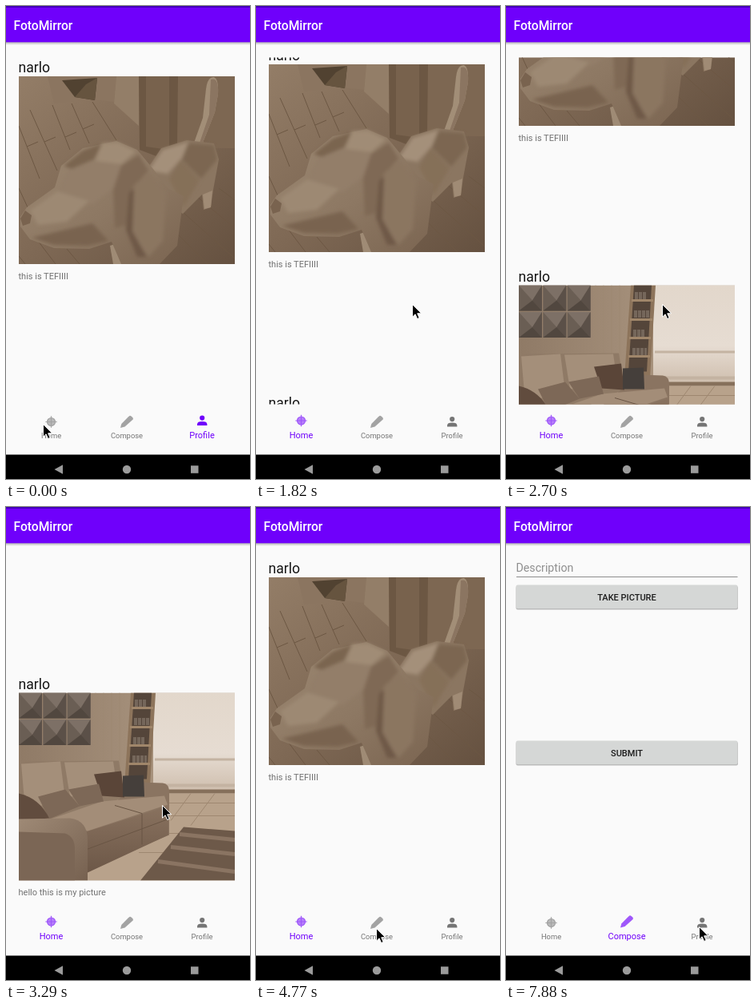
An HTML page that plays this animation: 305x592 px, repeating every 8000 ms.

```html
<!DOCTYPE html>
<html lang="en">
<head>
<meta charset="utf-8">
<title>Photo feed</title>
<style>
  html, body { margin: 0; width: 100%; height: 100%; overflow: hidden; background: #fafafa; }
  svg { display: block; width: 100%; height: 100%; }
  text { font-family: Roboto, sans-serif; }
  .bar { font-size: 15.6px; font-weight: 500; fill: #fff; }
  .user { font-size: 17.6px; fill: #151515; }
  .note { font-size: 11px; fill: #727272; }
  .hint { font-size: 14.2px; fill: #8f8f8f; }
  .button { font-size: 11px; font-weight: 500; fill: #1c1c1c; text-anchor: middle; }
  .tab { color: #757575; }
  .tab text { font-size: 9.4px; text-anchor: middle; fill: currentColor; }
  .tab .icon { fill: currentColor; stroke: none; }
  .tab .pale { opacity: .65; }
  .tab.on { color: #6f00fb; }
  .tab.on text { font-size: 11px; }
  .tab.on .icon { transform: translateY(-1.5px); }
</style>
</head>
<body>
<svg viewBox="0 0 305 592" preserveAspectRatio="none">
  <defs>
    <clipPath id="feedArea"><rect x="0" y="64.5" width="305" height="434"/></clipPath>
    <clipPath id="photoArea"><rect width="270" height="235"/></clipPath>
    <filter id="soft"><feGaussianBlur stdDeviation="2.2"/></filter>
    <linearGradient id="shade" x2="0" y2="1">
      <stop stop-color="#000" stop-opacity=".3"/><stop offset="1" stop-color="#000" stop-opacity="0"/>
    </linearGradient>
    <linearGradient id="floor" x2="1" y2="1">
      <stop stop-color="#937d67"/><stop offset=".5" stop-color="#7f6955"/><stop offset="1" stop-color="#655140"/>
    </linearGradient>
    <linearGradient id="fur" x2="1" y2="1">
      <stop stop-color="#9c8872"/><stop offset=".55" stop-color="#8d7863"/><stop offset="1" stop-color="#7b6551"/>
    </linearGradient>
    <linearGradient id="wall" x2="1" y2="0">
      <stop stop-color="#8f7a66"/><stop offset="1" stop-color="#b5a08a"/>
    </linearGradient>
    <linearGradient id="window" x2="0" y2="1">
      <stop stop-color="#e2d7cb"/><stop offset=".6" stop-color="#e6dcd2"/><stop offset="1" stop-color="#cdbcab"/>
    </linearGradient>
    <linearGradient id="front" x2="0" y2="1">
      <stop stop-color="#89725f"/><stop offset="1" stop-color="#6c5747"/>
    </linearGradient>
    <linearGradient id="arm" x2="1" y2="1">
      <stop stop-color="#9f8a76"/><stop offset="1" stop-color="#766150"/>
    </linearGradient>
    <g id="pyramid">
      <path fill="#6a5e54" d="M0 0H29V32H0Z"/>
      <path fill="#7d7066" d="M0 0H29L17 19Z"/>
      <path fill="#5b5048" d="M29 0V32L17 19Z"/>
      <path fill="#51473f" d="M0 32H29L17 19Z"/>
    </g>
  </defs>

  <rect width="305" height="592" fill="#fafafa"/>

  <g id="feed" clip-path="url(#feedArea)">
    <g id="posts">
      <g>
        <text class="user" x="15.5" y="83">narlo</text>
        <g transform="translate(16 88)" clip-path="url(#photoArea)">
          <rect width="270" height="235" fill="url(#floor)"/>
          <path fill="#8b7560" d="M36 0H122L119 32 94 29 44 34Z"/>
          <path fill="#514231" d="M54 5 98 2 95 30 70 26Z"/>
          <path fill="#66543f" d="M70 26 84 10 98 2 95 30Z"/>
          <path fill="#937e68" d="M122 0H150V62L119 34Z"/>
          <path fill="#6c5743" d="M150 0H200L198 110 151 92Z"/>
          <path fill="#78624d" d="M159 0H188V92L159 88Z"/>
          <path fill="#7d6752" d="M199 0H270V90H198Z"/>
          <path fill="none" stroke="#6c5743" stroke-width="1" d="M0 62 26 128M14 42 48 118M42 36 64 92M66 34 88 84M92 32 122 80M0 140 12 166M10 88 24 82M32 82 46 76M58 76 72 70M80 66 94 60M0 225 8 235M24 206 46 235M60 216 76 235M205 170 270 228M222 150 270 190M196 195 236 235M250 140 270 155"/>
          <path fill="#a28e77" d="M218 86 230 52 234 16Q236 0 244 1Q250 3 249 22L245 45 228 88Z"/>
          <path fill="#8b7561" d="M240 4Q250 0 249 22L245 45 228 88 225 86 238 48Z"/>
          <path fill="#8b7661" d="M158 120 178 90 210 80 244 84 250 104 243 142 240 164 231 167 229 148 205 172 186 160Z"/>
          <g filter="url(#soft)">
            <path fill="#a4907a" d="M162 118 180 92 212 82 204 102 186 122Z"/>
            <path fill="#7c6651" d="M212 84 244 86 248 104 228 128 204 104Z"/>
            <path fill="#857059" d="M202 104 226 130 206 164 188 128Z"/>
          </g>
          <path fill="#a08b75" d="M230 148 242 143 240 164 232 166Z"/>
          <path fill="#9f8b75" d="M114 212 126 208 130 235H118Z"/>
          <path fill="url(#fur)" d="M2 176 10 164 45 139 53 112 80 90 122 81 148 92 168 116 186 140 206 150 198 212 176 235H128L116 207 88 216 44 215 14 204 2 188Z"/>
          <g filter="url(#soft)">
            <path fill="#7a6550" d="M56 112 80 93 104 84 94 104 66 116Z"/>
            <path fill="#a08c76" d="M104 84 124 83 146 94 128 110 96 106Z"/>
            <path fill="#937e69" d="M60 118 96 106 128 110 118 140 92 160 50 146Z"/>
            <path fill="#9d8973" d="M14 168 48 144 88 156 60 182 24 186Z"/>
            <path fill="#7f6954" d="M128 112 150 98 162 118 142 140 134 186 120 190 118 142Z"/>
            <path fill="#8b7661" d="M144 136 164 120 184 146 180 206 162 226 140 196Z"/>
            <path fill="#6e5946" d="M138 146 144 140 142 194 160 226 148 226 134 192Z"/>
            <path fill="#79644f" d="M16 202 50 194 92 184 112 206 86 212 44 211Z"/>
          </g>
          <path fill="#79634f" d="M2 178 8 168 16 174 14 184 5 187Z"/>
        </g>
        <text class="note" x="15.5" y="341.5">this is TEFIIII</text>
      </g>
      <g transform="translate(0 434.5)">
        <text class="user" x="15.5" y="83">narlo</text>
        <g transform="translate(16 88)" clip-path="url(#photoArea)">
          <rect width="270" height="235" fill="url(#wall)"/>
          <path stroke="#9d8872" d="M96 0V95M106 0V95M116 0V95M126 0V95"/>
          <g id="panels"></g>
          <rect x="168" width="102" height="126" fill="url(#window)"/>
          <path fill="#c4b3a2" d="M170 82H270V85H170ZM172 114H270V118H172Z"/>
          <path fill="#86705b" d="M186 121H270V126H186Z"/>
          <path fill="#8d745b" d="M140 0H171L164 116H132Z"/>
          <path fill="#54453a" d="M144 0H166L160 108H137Z"/>
          <path stroke="#a0866a" stroke-width="3" d="M141 19H168M139 43H167M138 66H165M137 89H164"/>
          <path stroke="#75675b" stroke-width="9" stroke-dasharray="4 1" d="M145 13H160M144 36H163M143 60H157M142 83H160"/>
          <path fill="#b8a28b" d="M160 126H270V235H40Z"/>
          <path stroke="#9e8770" d="M186 138H270M190 154H270M172 176H260M215 126 190 160M245 126 215 166M150 200H190"/>
          <path fill="#6d5949" d="M206 168 270 173V235H152Z"/>
          <path stroke="#8a7462" stroke-width="5" d="M201 177 270 184M190 193 270 202M174 211 270 224"/>
          <path fill="#8f7a66" d="M0 90 8 86 125 85 132 130 84 152 0 162Z"/>
          <path fill="#a48f7a" d="M3 89 52 86 58 134 8 146ZM57 87 118 86 124 126 64 130Z"/>
          <path fill="#8a7461" d="M150 112 180 113Q188 114 188 124V178L84 222V168Z"/>
          <path fill="#a38d78" d="M40 158 104 136 182 129 186 140 86 173Z"/>
          <path fill="url(#front)" d="M84 174 187 142V178L84 226Z"/>
          <path stroke="#695544" d="M85 196 187 158M120 141 154 151V190" fill="none"/>
          <path fill="#5a4538" d="M94 102 128 98 132 131 103 129Z"/>
          <path fill="#453f3b" d="M130 104 156 103 157 130 130 130Z"/>
          <path fill="#7d6857" d="M24 130 58 121 76 142 38 158ZM62 121 100 114 106 136 76 142Z"/>
          <path fill="#614c3e" d="M0 126Q26 132 38 157L0 160Z"/>
          <path fill="url(#arm)" d="M0 158 64 157Q86 160 86 184V235H0Z"/>
          <path fill="#7b6655" d="M0 174 58 176Q70 180 70 196V235H0Z"/>
        </g>
        <text class="note" x="15.5" y="341.5">hello this is my picture</text>
      </g>
    </g>
  </g>

  <g id="form">
    <text class="hint" x="12.5" y="81">Description</text>
    <path stroke="#8d8d8d" d="M13 87.5H289.5"/>
    <rect x="12.5" y="99" width="277.5" height="29.5" rx="2" fill="#bbb"/>
    <rect x="12.5" y="97.5" width="277" height="29.5" rx="2" fill="#d5d7d6"/>
    <text class="button" x="151" y="116.8">TAKE PICTURE</text>
    <rect x="12.5" y="294" width="277.5" height="29.5" rx="2" fill="#bbb"/>
    <rect x="12.5" y="292.5" width="277" height="29.5" rx="2" fill="#d5d7d6"/>
    <text class="button" x="151" y="311.6">SUBMIT</text>
  </g>

  <rect y="45" width="305" height="4" fill="url(#shade)"/>
  <rect width="305" height="45.3" fill="#6f00fb"/>
  <rect width="305" height="2" fill="#4300b8"/>
  <text class="bar" x="9.5" y="30.3">FotoMirror</text>

  <g class="tab">
    <g class="icon pale">
      <circle cx="56.5" cy="520.5" r="5" fill-opacity=".75" stroke="currentColor" stroke-width="1.2"/>
      <path stroke="currentColor" stroke-width="1.2" d="M49.3 520.5H63.7M56.5 513.3V527.7"/>
    </g>
    <text x="56.5" y="541">Home</text>
  </g>
  <g class="tab">
    <path class="icon pale" d="M143 528 144.3 523 152.6 514.4 154.3 512.9Q155.4 512.3 156.6 513.4L158.3 515Q159.4 516.2 158.6 517.4L157 518.9 148.6 526.6Z"/>
    <text x="151" y="541">Compose</text>
  </g>
  <g class="tab">
    <path class="icon" d="M245.2 514A3.1 3.1 0 0 1 245.2 520.2A3.1 3.1 0 0 1 245.2 514ZM239 526.6V525Q239 521.6 245.2 521.6T251.4 525V526.6Z"/>
    <text x="245" y="541">Profile</text>
  </g>

  <rect y="561.5" width="305" height="31" fill="#000"/>
  <path fill="#9b9b9b" d="M60.5 580 71 574.3V585.7ZM231 575.2H240.5V584.8H231Z"/>
  <circle cx="151" cy="580" r="5.2" fill="#9b9b9b"/>

  <path id="cursor" fill="#000" stroke="#fff" stroke-width="1" d="M.5.5V16.2L4.1 12.8 6.6 18.5 9.2 17.4 6.7 11.8H11.7Z"/>
</svg>
<script>
const LOOP = 8000;
const HOME = 0, COMPOSE = 1, PROFILE = 2;

// Each row: start time in ms, then the value held from there on.
const tabSteps = [[0, PROFILE], [180, HOME], [5210, COMPOSE]];
const loadedSteps = [[0, true], [180, false], [480, true]];
const scrollSteps = [
  [0, 0], [1820, 15], [1970, 38], [2110, 62], [2260, 88], [2410, 115],
  [2550, 144], [2700, 173], [2840, 202], [2990, 231], [3290, 290],
  [3440, 362], [3590, 434.5], [4330, 250], [4480, 70], [4620, 0]
];
const cursorSteps = [
  [0, 46, 523], [620, 54, 511], [770, 73, 480], [920, 105, 391], [1370, 195, 373],
  [4620, 170, 458], [4770, 150, 527],
  [6550, 155, 518], [6700, 172, 505], [6840, 194, 508], [6990, 211, 519],
  [7580, 219, 521], [7730, 232, 523], [7880, 241, 525]
];

const byId = id => document.getElementById(id);
const held = (steps, t) => steps.findLast(step => step[0] <= t).slice(1);
const show = (node, on) => node.setAttribute('display', on ? 'inline' : 'none');
const move = (node, x, y) => node.setAttribute('transform', `translate(${x} ${y})`);

const feed = byId('feed'), posts = byId('posts'), form = byId('form'), cursor = byId('cursor');
const tabs = [...document.querySelectorAll('.tab')];

for (let i = 0; i < 6; i++) {
  const tile = document.createElementNS('http://www.w3.org/2000/svg', 'use');
  tile.setAttribute('href', '#pyramid');
  move(tile, (i % 3) * 30.3, Math.floor(i / 3) * 33.5);
  byId('panels').append(tile);
}

function draw(t) {
  const [tab] = held(tabSteps, t);
  const [loaded] = held(loadedSteps, t);
  tabs.forEach((node, i) => node.classList.toggle('on', i === tab));
  show(feed, tab !== COMPOSE && loaded);
  show(form, tab === COMPOSE);
  move(posts, 0, -held(scrollSteps, t)[0]);
  move(cursor, ...held(cursorSteps, t));
}

const start = performance.now();
function tick() {
  draw((performance.now() - start) % LOOP);
  requestAnimationFrame(tick);
}
tick();
</script>
</body>
</html>
```
